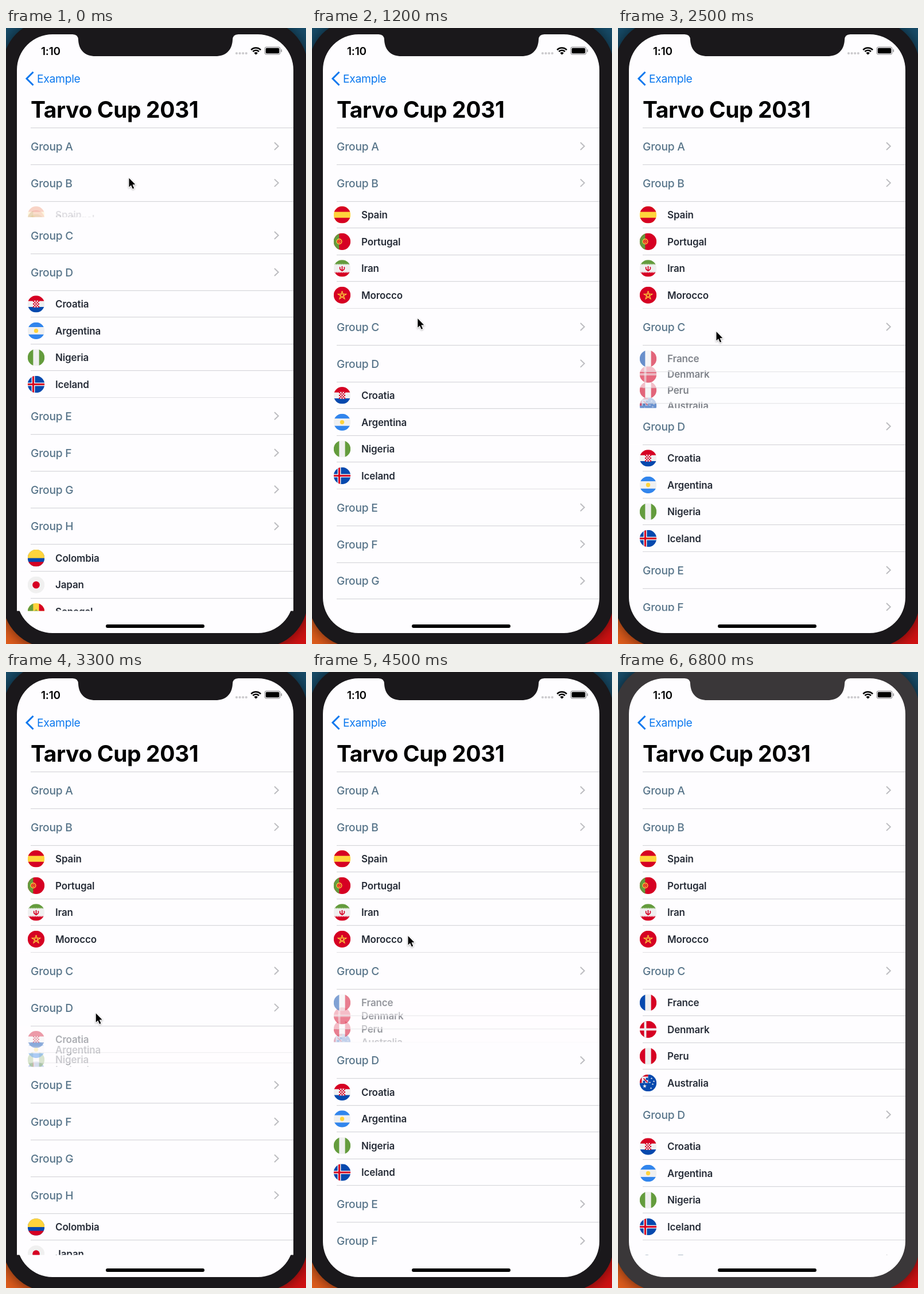
Recreate the animation shown at these times as an HTML page with a canvas. Size 523 by 1071 pixels, loop 7000 ms.

```html
<!DOCTYPE html>
<html lang="en">
<head>
<meta charset="utf-8">
<style>
html, body { margin: 0; width: 100%; height: 100%; overflow: hidden; background: #1a181b; }
canvas { display: block; }
</style>
</head>
<body>
<canvas id="stage" width="523" height="1071"></canvas>
<script>
const ctx = document.getElementById('stage').getContext('2d');
const LOOP = 7000, HEAD = 63.9, ITEM = 46.55, TOP = 173.5, R = 14.7;
const RED = '#d60023', BLUE = '#0649ae', WHITE = '#f0f0f0', GREEN = '#649c3d',
  YELLOW = '#ffd43c', SKY = '#3185ed', SCREEN = '#fefdff';

// ---- drawing helpers ----
function box(color, x, y, w, h) {
  ctx.fillStyle = color;
  ctx.fillRect(x, y, w, h);
}
function pill(color, x, y, w, h, r) {
  ctx.fillStyle = color;
  ctx.beginPath();
  ctx.roundRect(x, y, w, h, r);
  ctx.fill();
}
function disc(color, x, y, r) {
  ctx.fillStyle = color;
  ctx.beginPath();
  ctx.arc(x, y, r, 0, 7);
  ctx.fill();
}
function stroke(color, width, points) {
  ctx.strokeStyle = color;
  ctx.lineWidth = width;
  ctx.beginPath();
  points.forEach(([x, y]) => ctx.lineTo(x, y));
  ctx.stroke();
}
function star(color, x, y, r) {
  ctx.fillStyle = color;
  ctx.beginPath();
  for (let i = 0; i < 10; i++) {
    const a = i * Math.PI / 5 - Math.PI / 2, d = i % 2 ? r * .42 : r;
    ctx.lineTo(x + d * Math.cos(a), y + d * Math.sin(a));
  }
  ctx.fill();
}
function text(str, x, y, size, weight, color, spacing) {
  ctx.font = `${weight} ${size}px Inter, Roboto, sans-serif`;
  ctx.letterSpacing = spacing + 'px';
  ctx.fillStyle = color;
  ctx.fillText(str, x, y);
}
const rule = y => box('#d6d6da', 43, Math.round(y - .7), 458, 1.2);

// ---- flags, drawn around the origin ----
function rows(a, b, c, cut = .35) {
  box(b, -R, -R, 2 * R, 2 * R);
  box(a, -R, -R, 2 * R, R * (1 - cut));
  box(c, -R, R * cut, 2 * R, R * (1 - cut));
}
function columns(a, b, c) {
  box(b, -R, -R, 2 * R, 2 * R);
  box(a, -R, -R, R * .65, 2 * R);
  box(c, R * .35, -R, R * .65, 2 * R);
}
function cross(color, width) {
  box(color, -5 - width / 2, -R, width, 2 * R);
  box(color, -R, -width / 2, 2 * R, width);
}
const field = color => box(color, -R, -R, 2 * R, 2 * R);

const flags = {
  Spain: () => rows(RED, YELLOW, RED),
  Portugal() {
    field(RED);
    box(GREEN, -R, -R, R * .65, 2 * R);
    disc(YELLOW, -5, 0, 5);
    disc(RED, -5, 0, 3.6);
    pill(YELLOW, -7, -2.6, 4, 5.2, 2);
    pill(RED, -6.1, -1.8, 2.2, 3.4, 1);
  },
  Iran() {
    rows(GREEN, WHITE, RED, .45);
    for (let x = -12; x < 13; x += 3) {
      box(WHITE, x, -7.8, 1.5, 1.5);
      box(WHITE, x, 6.4, 1.5, 1.5);
    }
    stroke(RED, 1.8, [[0, -4], [0, 5]]);
    ctx.beginPath();
    ctx.arc(0, -.5, 4, -.5, Math.PI + .5);
    ctx.stroke();
  },
  Morocco() {
    field(RED);
    const points = [];
    for (let i = 0; i < 6; i++) {
      const a = i * Math.PI * .8 - Math.PI / 2;
      points.push([7.5 * Math.cos(a), 7.5 * Math.sin(a) + .4]);
    }
    stroke(YELLOW, 1.2, points);
  },
  France: () => columns(BLUE, WHITE, RED),
  Denmark() { field(RED); cross(WHITE, 3.9); },
  Peru: () => columns(RED, WHITE, RED),
  Australia() {
    field(BLUE);
    box(WHITE, -R, -R, R, R);
    box(RED, -R, -R, R, 3.6);
    box(RED, -R, -R, 3.6, R);
    stroke(RED, 1.8, [[-8, -8], [-1, -1]]);
    box(BLUE, -9, -4, 4, 4);
    box(BLUE, -4, -9, 4, 4);
    star(WHITE, -6, 5.5, 3.6);
    [[5, 9], [3, -1], [6, -8], [10, -3], [8, 2]].forEach(([x, y]) => star(WHITE, x, y, 1.9));
  },
  Croatia() {
    rows(RED, WHITE, BLUE);
    box(WHITE, -5.5, -6, 11, 12);
    for (let i = 0; i < 25; i += 2)
      box(RED, -5.5 + i % 5 * 2.2, -6 + Math.floor(i / 5) * 2.4, 2.2, 2.4);
  },
  Argentina() { rows(SKY, WHITE, SKY, .435); disc(YELLOW, 0, 0, 3.7); },
  Nigeria: () => columns(GREEN, WHITE, GREEN),
  Iceland() { field(BLUE); cross(WHITE, 5.8); cross(RED, 3); },
  Colombia() { rows(YELLOW, BLUE, RED, .45); box(YELLOW, -R, -R, 2 * R, R); },
  Japan() { field(WHITE); disc(RED, 0, 0, 6.3); },
  Senegal() { columns(GREEN, YELLOW, RED); star(GREEN, 0, 0, 5); }
};

const groups = {
  A: [],
  B: ['Spain', 'Portugal', 'Iran', 'Morocco'],
  C: ['France', 'Denmark', 'Peru', 'Australia'],
  D: ['Croatia', 'Argentina', 'Nigeria', 'Iceland'],
  E: [], F: [], G: [],
  H: ['Colombia', 'Japan', 'Senegal']
};

// ---- motion ----
const startsOpen = 'DH';
const toggles = [['B', -99], ['C', 1400], ['C', 2323], ['D', 3070], ['D', 3750], ['C', 4303]];
const pointer = [[0, 214, 260], [250, 213, 264], [1100, 184, 504], [1500, 183, 506],
  [2100, 171, 527], [2550, 171, 527], [3000, 156, 593], [3850, 157, 591],
  [4250, 174, 523], [4380, 172, 508], [4500, 167, 458], [5000, -20, 330]];

const ease = s => (1 - Math.cos(Math.PI * Math.min(1, Math.max(0, s)))) / 2;

function openness(name, t) {
  let open = startsOpen.includes(name) ? 1 : 0, value = open;
  for (const [group, start] of toggles) {
    if (group !== name || t < start) continue;
    const k = ease((t - start) / 400);
    value = open ? 1 - k : k;
    open = 1 - open;
  }
  return value;
}

// ---- scene parts ----
function drawPhone(t) {
  const bg = ctx.createLinearGradient(0, 0, 523, 0);
  bg.addColorStop(0, '#de5d1c');
  bg.addColorStop(1, '#d11012');
  box(bg, 0, 500, 523, 571);
  box('#174c69', 0, 0, 523, 500);
  const shell = t < 5700 ? '#1a181b' : '#3a3739';
  ctx.save();
  ctx.shadowColor = 'rgba(0,0,0,.6)';
  ctx.shadowBlur = 24;
  pill(shell, -6, -14, 532, 1091, 82);
  ctx.restore();
  pill(SCREEN, 19, 11, 482, 1041, 62);
  ctx.fillStyle = shell;
  ctx.beginPath();
  ctx.moveTo(116, 10);
  ctx.lineTo(116, 11);
  ctx.quadraticCurveTo(126, 11, 126, 21);
  ctx.bezierCurveTo(127, 39, 138, 49, 156, 49);
  ctx.lineTo(365, 49);
  ctx.bezierCurveTo(383, 49, 394, 39, 395, 21);
  ctx.quadraticCurveTo(395, 11, 405, 11);
  ctx.lineTo(405, 10);
  ctx.fill();
}

function drawBars() {
  text('1:10', 61, 46.5, 19, 600, '#000', -.2);
  for (let i = 0; i < 4; i++) disc('#cbcacd', 402 + i * 5.6, 44, 2.1);
  ctx.strokeStyle = '#000';
  ctx.lineWidth = 2.6;
  for (const r of [11.5, 7.3]) {
    ctx.beginPath();
    ctx.arc(435.7, 46, r, -Math.PI * .76, -Math.PI * .24);
    ctx.stroke();
  }
  ctx.fillStyle = '#000';
  ctx.beginPath();
  ctx.moveTo(435.7, 46.5);
  ctx.arc(435.7, 46.5, 4.4, -Math.PI * .76, -Math.PI * .24);
  ctx.fill();
  pill('#9b9a9d', 450.5, 32.5, 28, 14, 4);
  pill(SCREEN, 451.7, 33.7, 25.6, 11.6, 3);
  pill('#000', 452.7, 34.7, 23.6, 9.6, 2);
  pill('#9b9a9d', 479.3, 37, 1.8, 5, 1);

  stroke('#0b78ee', 3, [[47.5, 76.5], [36, 88], [47.5, 99.5]]);
  text('Example', 54, 95, 19.3, 400, '#0b78ee', -.3);
  text('Tarvo Cup 2031', 43, 155.5, 39, 700, '#000', -.4);
  rule(TOP + .6);
  pill('#000', 174, 1037, 172, 6, 3);
}

function drawItem(name, y) {
  const mid = y + ITEM / 2 + .2;
  box(SCREEN, 19, y, 482, ITEM);
  ctx.save();
  ctx.translate(52.5, mid);
  ctx.beginPath();
  ctx.arc(0, 0, R, 0, 7);
  ctx.clip();
  flags[name]();
  ctx.restore();
  text(name, 86, mid + 6.2, 17, 600, '#262c37', -.15);
  rule(y + ITEM);
}

function drawList(t) {
  ctx.save();
  ctx.beginPath();
  ctx.rect(19, TOP, 482, 1013.5 - TOP);
  ctx.clip();
  let y = TOP;
  for (const [name, teams] of Object.entries(groups)) {
    const mid = y + HEAD / 2;
    text('Group ' + name, 43, mid + 7.2, 19.2, 500, '#58758a', -.2);
    stroke('#bdbdc1', 2, [[468, mid - 6.5], [474.8, mid], [468, mid + 6.5]]);
    y += HEAD;
    const p = openness(name, t), height = teams.length * ITEM * p;
    if (p > 0) {
      ctx.save();
      ctx.beginPath();
      ctx.rect(19, y, 482, height + .3);
      ctx.clip();
      ctx.globalAlpha = p;
      // upper rows lie over lower ones
      for (let i = teams.length - 1; i >= 0; i--) drawItem(teams[i], y + i * ITEM * p);
      ctx.restore();
    }
    rule(y);
    y += height;
  }
  ctx.restore();
}

function drawPointer(t) {
  const i = pointer.findIndex(([time]) => time > t);
  if (i < 1) return;
  const [t0, x0, y0] = pointer[i - 1], [t1, x1, y1] = pointer[i];
  const k = ease((t - t0) / (t1 - t0));
  ctx.save();
  ctx.translate(x0 + (x1 - x0) * k, y0 + (y1 - y0) * k);
  ctx.shadowColor = 'rgba(0,0,0,.35)';
  ctx.shadowBlur = 3;
  ctx.shadowOffsetY = 1;
  ctx.fillStyle = '#000';
  stroke('#fff', 2, [[.5, 1], [.5, 16.5], [4, 13.2], [6.8, 19.5], [9.2, 18.4], [6.5, 12.3], [11.3, 12], [.5, 1]]);
  ctx.shadowColor = 'transparent';
  ctx.fill();
  ctx.restore();
}

const begin = performance.now();
function frame() {
  const t = (performance.now() - begin) % LOOP;
  drawPhone(t);
  drawBars();
  drawList(t);
  drawPointer(t);
  requestAnimationFrame(frame);
}
frame();
</script>
</body>
</html>
```
